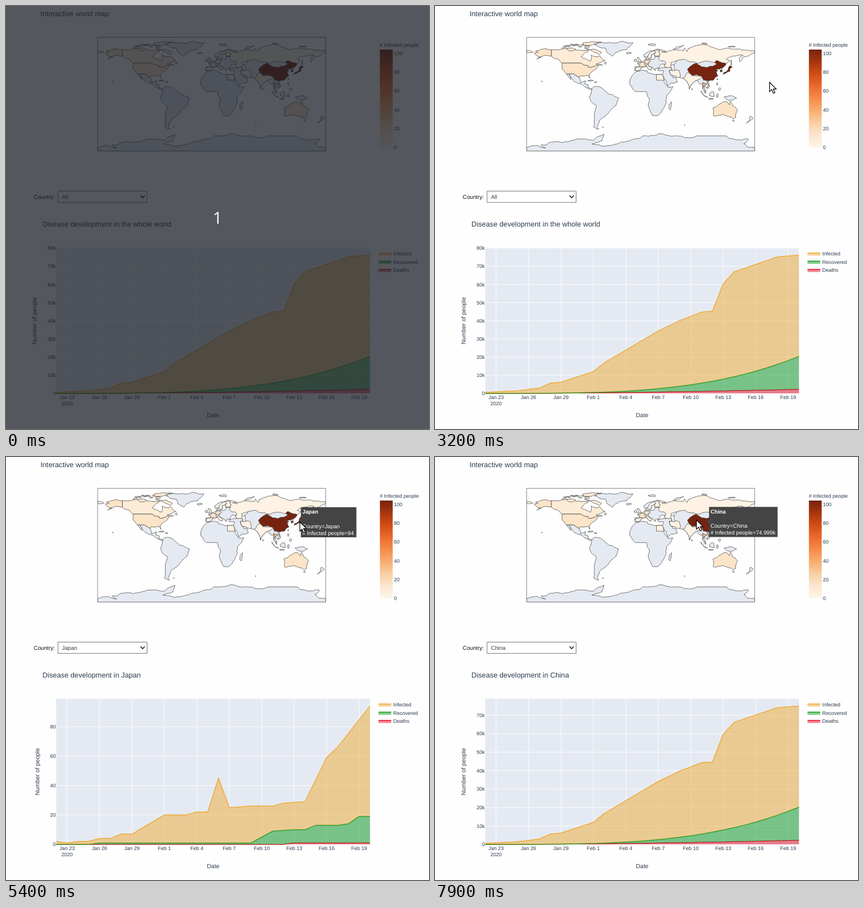
An HTML page for the animation above (8000 ms loop, 748 by 748 pixels).

```html
<!DOCTYPE html>
<html lang="en">
<head>
<meta charset="utf-8">
<title>Interactive world map</title>
<style>
html, body { margin: 0; width: 100%; height: 100%; overflow: hidden; background: #fefefe; }
svg { display: block; width: 748px; height: 748px; font: 9px "Liberation Sans", Arial, sans-serif;
  fill: #2c3b50; text-rendering: geometricPrecision; }
.title { font-size: 12.73px; }
.axis { font-size: 10.5px; }
.form { font-size: 9.9px; }
.tip { font-size: 9.72px; fill: #fff; }
#land path { stroke: #444; stroke-width: .75; stroke-linejoin: round; vector-effect: non-scaling-stroke; }
</style>
</head>
<body>
<svg viewBox="0 0 748 748">
  <defs>
    <linearGradient id="scale" x2="0" y2="1"></linearGradient>
    <clipPath id="frame"><path d="M162 55h403.5v201.5H162z"/></clipPath>
  </defs>
  <text class="title" x="61" y="18">Interactive world map</text>
  <g clip-path="url(#frame)">
    <g id="land" transform="translate(363.6 155.8) scale(1.12 -1.12)"></g>
  </g>
  <path d="M162 55.4h403.3v201H162z" fill="none" stroke="#666" stroke-width=".8"/>
  <path d="M661.2 77h22.6v172.8h-22.6z" fill="url(#scale)"/>
  <text x="661" y="72"># Infected people</text>
  <g id="scaleTicks"></g>

  <text class="form" x="49" y="341" fill="#111">Country:</text>
  <path d="M92 327.3h157.5v20H92z" fill="#fff" stroke="#666" stroke-width=".9"/>
  <path d="M237.8 335l3.8 4 3.8-4" fill="none" stroke="#222" stroke-width="1.6"/>
  <text id="choice" class="form" x="99" y="341" fill="#3c3c3c"></text>

  <text id="heading" class="title" x="64.5" y="390"></text>
  <g id="chart"></g>
  <text class="axis" x="366.3" y="727" text-anchor="middle">Date</text>
  <g id="legend"></g>

  <g id="tip" class="tip"></g>
  <path id="cursor" d="M.6 .8v16.4l3.8-3.6 2.9 6.6 2.8-1.2-2.9-6.4h5.2z" fill="#fff" stroke="#000" stroke-width="1.2"/>
  <g id="intro">
    <path d="M0 0h748v748H0z" fill="rgb(27,31,39)" fill-opacity=".75"/>
    <text x="374" y="385" text-anchor="middle" fill="#fff"
      style="font:500 29px 'Open Sans','Noto Sans',sans-serif">1</text>
  </g>
</svg>
<script>
const $ = id => document.getElementById(id);
const text = (x, y, s, anchor = "start") => `<text x="${x}" y="${y}" text-anchor="${anchor}">${s}</text>`;
const clamp = v => Math.max(0, Math.min(1, v));

// --- Map: key points in degrees; coasts get their detail from midpoint displacement.
const plain = "#e5eaf2", faint = "#fdf2e4", pale = "#fcebd6", light = "#fbe4c8", mid = "#f6b27a", dark = "#76230f";
const regions = [
  // Europe and Arabia, Asia, Scandinavia
  [plain, `30,60 23,59 21,55 11,54 10,57 8,57 8,54 2,51 -5,48 -1,46 -2,43 -9,43 -9,37 -2,37 3,43 9,44 16,38 18,40
    12,45 20,41 23,37 23,40 29,41 31,46 39,47 37,45 41,42 27,40 28,37 36,37 34,31 43,13 58,19 56,26 51,26 48,30
    45,37 49,38 48,55`],
  [plain, `48,30 57,27 67,25 73,20 77,8 80,15 89,22 94,16 98,16 98,8 103,1 100,13 105,9 109,12 106,19 108,21 114,22
    122,29 119,35 122,37 118,39 125,40 126,35 129,36 128,40 131,43 120,56 60,58 50,45 49,38 45,37`],
  [plain, "31,70 29,67 31,63 28,60 22,60 22,63 24,66 17,62 17,57 13,56 11,59 6,58 5,62 14,68 25,71"],
  // Sweden, Finland, Russia
  [faint, "24,66 17,62 17,57 13,56 11,59 13,63 20,69"],
  [faint, "24,66 20,69 28,70 29,67 31,63 28,60 22,60 22,63"],
  [faint, `31,70 41,67 33,67 40,65 44,68 68,69 69,73 73,67 75,72 104,78 113,74 140,72 180,69 180,65 170,60 163,59
    157,51 156,57 162,61 143,59 135,55 141,53 131,43 135,48 127,50 120,53 117,50 98,51 88,49 70,55 61,54 48,50
    49,42 41,42 37,45 39,47 40,50 31,53 28,56 30,60 28,60 31,63 29,67`],
  [faint, "-180,69 -170,66 -180,65"],
  [faint, "52,71 56,74 68,77 57,72"],
  // Africa, Madagascar, Egypt
  [plain, `-6,36 10,37 11,34 20,31 34,31 37,22 43,11 51,12 41,-2 40,-15 35,-24 27,-34 19,-34 12,-17 14,-10 9,4 -8,4
    -17,15 -17,21`],
  [plain, "49,-12 47,-25 44,-22 45,-16"],
  [faint, "25,31 34,31 37,22 25,22"],
  // The Americas
  [plain, `-77,8 -72,12 -62,10 -50,0 -35,-6 -39,-18 -48,-26 -58,-36 -65,-42 -69,-52 -66,-55 -74,-52 -73,-38 -70,-18
    -76,-14 -81,-5 -78,4`],
  [plain, `-117,32 -110,23 -113,31 -105,20 -91,14 -80,7 -77,8 -83,10 -83,15 -88,16 -87,21 -95,18 -97,26 -106,32`],
  [pale, `-141,70 -141,60 -130,55 -124,49 -95,49 -83,45 -82,42 -70,46 -67,45 -60,46 -70,48 -56,53 -64,60 -70,59
    -78,62 -79,52 -94,59 -86,66 -82,69 -95,69 -128,70`],
  [pale, "-89,73 -72,71 -62,66 -65,62 -73,66 -80,70"],
  [pale, "-90,77 -78,77 -62,82 -75,83 -91,81"],
  [light, `-124,49 -95,49 -83,45 -82,42 -70,46 -67,45 -76,36 -81,31 -80,25 -83,30 -97,28 -97,26 -106,32 -117,32
    -124,40`],
  [light, "-141,70 -156,71 -166,68 -162,66 -168,65 -162,59 -157,58 -164,55 -150,61 -141,60"],
  [plain, "-73,78 -60,82 -32,83 -12,81 -22,70 -40,65 -44,60 -54,67 -55,72 -68,76"],
  // Australia, Sumatra, New Zealand, Antarctica
  [light, `114,-22 115,-34 118,-35 129,-32 138,-35 146,-39 150,-37 153,-26 146,-19 142,-11 140,-17 136,-12 131,-12
    122,-18`],
  [plain, "95,5 106,-5 103,-4"],
  [plain, "173,-35 178,-38 167,-46 172,-41"],
  [plain, `-180,-84 -150,-85 -157,-80 -135,-75 -75,-73 -67,-67 -58,-63 -61,-74 -77,-79 -60,-82 -28,-76 -10,-71 50,-66
    70,-69 88,-66 135,-66 170,-71 163,-78 170,-84 180,-84 180,-90 -180,-90`],
  // United Kingdom, Germany, France, Spain, Italy
  [pale, "-5,50 1,51 -3,58 -6,57 -3,54"],
  [light, "8,54 14,54 15,51 12,50 13,48 8,48 6,50"],
  [light, "2,51 8,48 6,46 9,44 3,43 -2,43 -1,46 -5,48"],
  [faint, "-2,43 3,43 -2,37 -9,37 -7,42"],
  [faint, "9,44 7,45 12,47 12,45 18,40 16,38"],
  // Iran, India, Vietnam, Thailand
  [faint, "45,37 49,38 61,37 62,26 57,27 48,30"],
  [faint, "67,25 73,20 77,8 80,15 89,22 94,24 97,28 81,29 78,33 74,34 70,27"],
  [light, "103,22 108,21 106,19 109,12 105,9 107,14"],
  [mid, "98,19 105,16 100,13 98,8 98,16"],
  // China, Japan, South Korea, Caspian Sea
  [dark, `131,43 125,40 118,39 122,37 119,35 122,29 114,22 108,21 99,22 97,28 81,30 74,39 83,47 88,49 97,43 105,42
    120,47 117,50 120,53 127,50 135,48`],
  [dark, "130,31 131,34 137,37 141,45 145,43 141,40 141,36 136,34"],
  [dark, "126,35 129,36 128,38 126,38"],
  ["#fff", "47,45 53,46 54,37 50,37"],
];
// Islands: longitude, latitude and the two radii.
const islands = [
  [plain, "-19,65,4,1.4 18,78,6,1.7 -8,53,2,1.7 110,-7.5,4,.7 113,0,4,4 121,-2,1.5,3 141,-6,9,3 -79,21.5,4,.7 -71,19,2,.8 69.5,-49,.7,.4 -59.5,-52,1,.4"],
  [faint, "121,16,1,2 124.5,8,1.5,2 81,7.5,.8,1.2 100,80,4,.9 145,75,6,.7 143,50,.7,4"],
  [pale, "-110,71,7,2.4 -121,73,3,1.2 -56,49,2,1.5 -84,75,4,1"],
  [light, "146.5,-42,1.5,1.2 -156,20,.7,.7 102,4,1.3,2"],
  [mid, "121,23.5,.5,1.2"],
];
const noise = (x, y) => {
  const n = Math.sin(x * 12.9898 + y * 78.233) * 43758.5453;
  return n - Math.floor(n) - .5;
};
// Depends only on the end points, so neighbours share the same border.
function rough(a, b) {
  const [dx, dy] = [b[0] - a[0], b[1] - a[1]], size = Math.hypot(dx, dy);
  if (size < 2.5 || !dx || !dy) return [a];
  const x = (a[0] + b[0]) / 2, y = (a[1] + b[1]) / 2;
  const m = [x + noise(x, y) * size * .22, y + noise(y, x) * size * .22];
  return [...rough(a, m), ...rough(m, b)];
}
const shape = (fill, pts) => {
  const edge = pts.flatMap((p, i) => rough(p, pts[(i + 1) % pts.length]));
  return `<path fill="${fill}" d="M${edge.map(p => p.map(v => v.toFixed(2))).join(" ")}Z"/>`;
};
const numbers = s => s.trim().split(/\s+/).map(p => p.split(",").map(Number));
const island = (fill, [x, y, rx, ry]) => shape(fill, Array.from({ length: 7 }, (_, i) => {
  const r = 1 + .6 * noise(x + i, y), a = i * Math.PI / 3.5;
  return [x + r * rx * Math.cos(a), y + r * ry * Math.sin(a)];
}));
let map = regions.map(([fill, pts]) => shape(fill, numbers(pts))).join("") +
  islands.map(([fill, list]) => numbers(list).map(isle => island(fill, isle)).join("")).join("");
for (let i = 0; i < 9; i++) map += island(pale, [-119 + 3.4 * i, 76.5 + 4 * noise(i, 3), 2.5, .8]);
$("land").innerHTML = map;

// --- Colour bar
const oranges = [dark, "#a63610", "#d24d14", "#eb6a2c", "#f58b4a", "#f8ad70", "#f9cfa3", "#fce6cf", "#fdf5ea"];
$("scale").innerHTML = oranges.map((c, i) => `<stop offset="${i / 8}" stop-color="${c}"/>`).join("");
$("scaleTicks").innerHTML = [0, 20, 40, 60, 80, 100].map(v => text(686, 253 - 1.66 * v, v)).join("");

// --- Chart: 30 days from Jan 22; curves run straight between "day,value" keys.
const perDay = rule => Array.from({ length: 30 }, (_, i) => rule(i));
const between = keys => {
  const pts = numbers(keys);
  return perDay(i => {
    const k = Math.max(1, pts.findIndex(p => p[0] >= i)), [x0, y0] = pts[k - 1], [x1, y1] = pts[k];
    return y0 + (y1 - y0) * (i - x0) / (x1 - x0);
  });
};
const growth = (end, power) => perDay(i => end * (i / 29) ** power);
const cases = between(`0,555 3,1434 5,2927 6,5578 7,6166 10,12038 11,16787 13,23892 16,34391 18,40150 20,44802 21,45221
  22,60368 23,66885 27,75136 29,76197`);
const abroad = growth(1198, 2.4), closed = growth(20424, 3.45), deaths = growth(2247, 1.88);
const data = {
  All: [cases, closed, deaths],
  China: [cases.map((v, i) => v - abroad[i]), closed.map(v => v * .991), deaths],
  Japan: [
    between("0,2 1,1 2,2 3,2 4,4 5,4 6,7 7,7 10,20 12,20 13,22 14,22 15,45 16,25 18,26 20,26 21,28 23,29 25,59 26,66 29,94"),
    between("0,0 3,0 4,1 18,1 20,9 22,10 23,10 24,13 26,13 27,14 28,19 29,19"),
    perDay(i => +(i > 21)),
  ],
};
const series = [["Infected", "#efab37"], ["Recovered", "#0d9b20"], ["Deaths", "#e8132d"]];
const dayX = i => 88.8 + i * 19.13;

$("legend").innerHTML = series.map(([name, color], i) => {
  const y = 436.7 + 14.5 * i;
  return `<path d="M658.7 ${y}h22.5v4.7h-22.5z" fill="${color}" fill-opacity=".5"/>
    <path d="M658.7 ${y}h22.5" stroke="${color}" stroke-width="1.5"/>` + text(684.7, y + 4.6, name);
}).join("");

function drawChart(place) {
  const rows = data[place], max = rows[0][29] / .95, big = max > 1000, step = big ? 1e4 : 20;
  const valueY = v => 685 - v / max * 257.5;
  const line = row => row.map((v, i) => `${dayX(i).toFixed(1)},${valueY(v).toFixed(2)}`);
  let grid = "", labels = "", areas = "";
  for (let i = 1; i < 30; i += 3) {
    const date = new Date(2020, 0, 22 + i), x = dayX(i);
    grid += `M${x} 427.5V685`;
    labels += text(x, 695, `${date.getMonth() ? "Feb" : "Jan"} ${date.getDate()}`, "middle");
  }
  for (let v = 0; v < max; v += step) {
    const y = valueY(v);
    grid += `M88.8 ${y}h554.8`;
    labels += text(88, y + 3.2, v && big ? v / 1000 + "k" : v, "end");
  }
  // Stacked from the bottom up, so upper lines cover lower ones.
  for (let i = 2; i >= 0; i--) {
    const color = series[i][1], top = line(rows[i]), base = line(rows[i + 1] || perDay(() => 0)).reverse();
    areas += `<path d="M${top.join(" ")} ${base.join(" ")}Z" fill="${color}" fill-opacity=".5"/>
      <path d="M${top.join(" ")}" fill="none" stroke="${color}" stroke-width="1.5"/>`;
  }
  $("chart").innerHTML = `<path d="M88.8 427.5h554.8V685h-554.8z" fill="${plain}"/>
    <path d="${grid}" stroke="#fff" stroke-width=".8"/>${areas}${labels}${text(dayX(1), 706, 2020, "middle")}
    <text class="axis" text-anchor="middle" transform="translate(${big ? 53.7 : 58.7} 556.5) rotate(-90)">Number of people</text>`;
  $("heading").textContent = "Disease development in " + (place === "All" ? "the whole world" : place);
}

// --- Hover label
const tips = { Japan: [517.2, 115.3, 98.2, "94"], China: [480.4, 114.8, 121.2, "74.999k"] };
function drawTip(place) {
  $("tip").innerHTML = "";
  if (!place) return;
  const [x, y, w, count] = tips[place];
  $("tip").innerHTML = `<path d="M${x} ${y}l4.2 4.4v22.2h${w}v-53.2h-${w}v22.2z" fill="#444"/>
    <g font-weight="bold">${text(x + 6.8, y - 15.1, place)}</g>` +
    text(x + 6.8, y + 10.2, "Country=" + place) + text(x + 6.8, y + 22.6, "# Infected people=" + count);
}

// --- Pointer moves: begin, end, x, y
const moves = [[2400, 2900, 603, 90], [2900, 3300, 587, 149], [3400, 3600, 566, 144], [3700, 4200, 527, 115],
  [4300, 4500, 524, 115], [4700, 4800, 519, 114], [6000, 6400, 478, 121], [7000, 7400, 473, 115], [7500, 7900, 461.7, 110.5]];
function pointer(t) {
  let x = 581, y = 10;
  for (const [begin, end, toX, toY] of moves) {
    const f = clamp((t - begin) / (end - begin));
    x += (toX - x) * f;
    y += (toY - y) * f;
  }
  return `translate(${x} ${y})`;
}

const at = (t, keys) => keys.filter(([start]) => start <= t).pop()[1];
const shown = {};
function update(part, value, draw) {
  if (shown[part] !== value) draw(shown[part] = value);
}

function render(now) {
  const t = Math.floor(now % 8000 / 100) * 100;
  update("chart", at(t, [[0, "All"], [5400, "Japan"], [6600, "China"]]), drawChart);
  update("choice", at(t, [[0, "All"], [5100, "Japan"], [6300, "China"]]), v => $("choice").textContent = v);
  update("tip", at(t, [[0, ""], [5000, "Japan"], [6100, ""], [6200, "China"]]), drawTip);
  $("intro").style.display = t < 100 ? "" : "none";
  $("cursor").style.display = t < 2200 ? "none" : "";
  $("cursor").setAttribute("transform", pointer(t));
}

const start = performance.now();
function tick() {
  render(performance.now() - start);
  requestAnimationFrame(tick);
}
tick();
</script>
</body>
</html>
```
